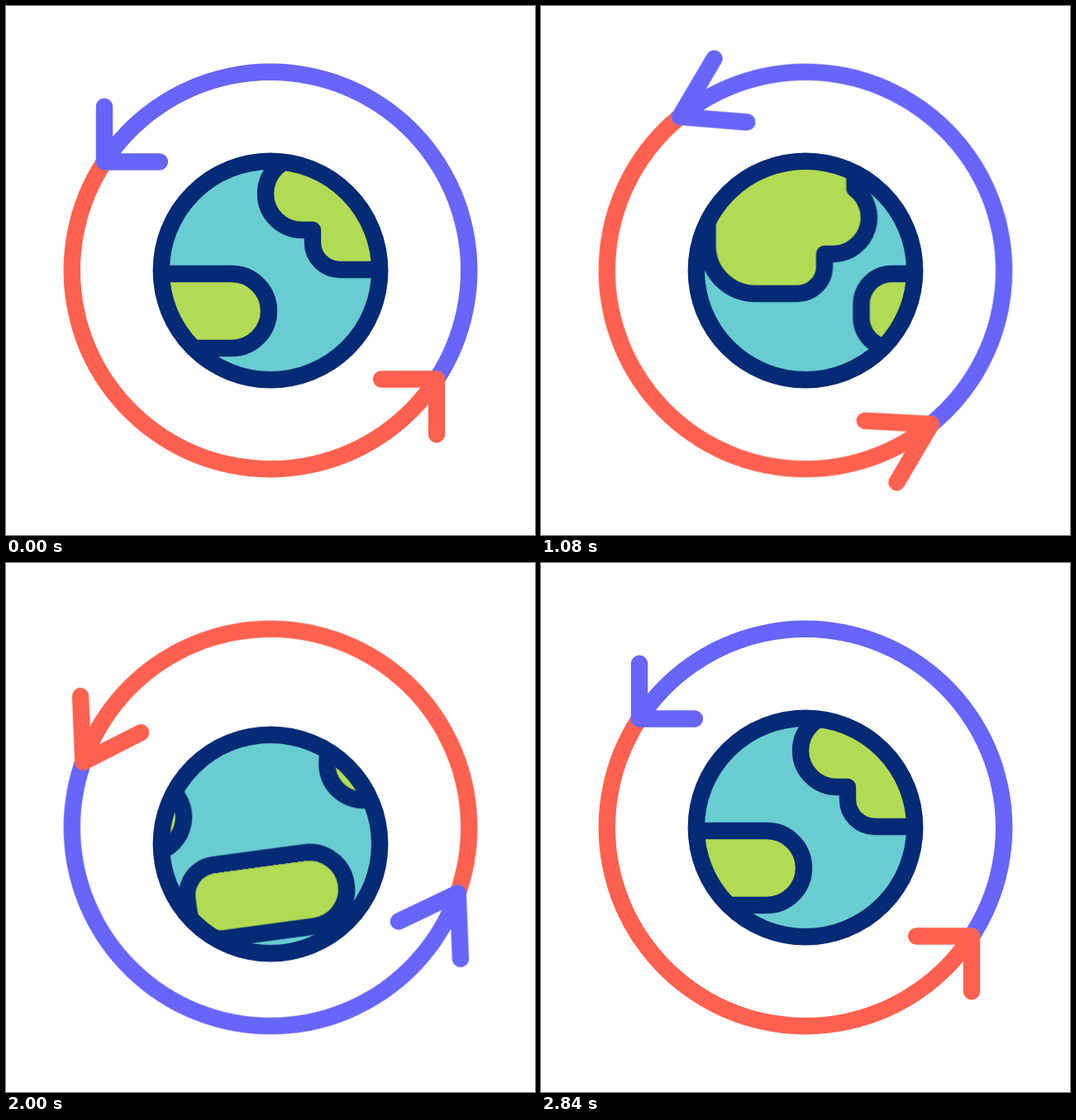
Animation, 640 px wide and 640 px high, one loop 3 s. Source, as an HTML page:

```html
<!DOCTYPE html>
<html lang="en">
<head>
<meta charset="utf-8">
<title>Turning globe</title>
<style>
  html, body { margin: 0; width: 100%; height: 100%; overflow: hidden; background: #fff; }
  svg { display: block; width: 100%; height: 100%; }

  .line { fill: none; stroke-width: 20.4; stroke-linejoin: round; }
  .head { stroke-linecap: round; }
  .purple { stroke: #6865fa; }
  .red { stroke: #ff6150; }
  .navy { stroke: #032a74; }
  .sea { fill: #68ccd1; }
  .land { fill: #b2da53; }

  .spin, .bob, .slide, .tilt, .head {
    --smooth: cubic-bezier(.333, 0, .667, 1);
    --swing: cubic-bezier(.533, 0, .336, 1);
    animation: 3s infinite var(--smooth);
  }
  .spin { animation-name: spin; }
  .bob { animation-name: bob; }
  .slide { animation-name: slide; animation-timing-function: var(--swing); }
  .tilt { animation-name: tilt; animation-timing-function: var(--swing); }
  .head.purple { animation-name: stretch-purple; }
  .head.red { animation-name: stretch-red; }

  /* The arrows wind back before the full turn. */
  @keyframes spin {
    0% { transform: rotate(0deg); }
    22.667% { transform: rotate(52deg); animation-timing-function: cubic-bezier(.335, 0, .805, 1); }
    93.333%, 100% { transform: rotate(-360deg); }
  }
  @keyframes bob {
    0%, 36%, 93.333%, 100% { transform: translateY(0); }
    20% { transform: translateY(-12.5px); }
    44.667% { transform: translateY(-5px); }
    73.333% { transform: translateY(24px); }
  }
  @keyframes slide {
    0%, 93.333%, 100% { transform: translateX(0); }
    25.667%, 37.333% { transform: translateX(262.5px); }
  }
  @keyframes tilt {
    0%, 38.667%, 85.333%, 100% { transform: rotate(0deg); }
    62.667% { transform: rotate(-8.1deg); }
  }

  /* Arrowheads grow longer and narrower while moving. */
  @keyframes stretch-purple {
    0%, 93.333%, 100% { d: path("M-201 -198.4L-201 -131.5L-134.1 -131.5"); }
    50% {
      d: path("M-178.4 -214L-201 -131.5L-118.5 -154.1");
      animation-timing-function: cubic-bezier(.333, 0, .667, .85);
    }
  }
  @keyframes stretch-red {
    0%, 93.333%, 100% { d: path("M-201 -198.4L-201 -131.5L-134.1 -131.5"); }
    50% {
      d: path("M-178.4 -214L-201 -131.5L-120.7 -156.3");
      animation-timing-function: cubic-bezier(.333, 0, .667, .85);
    }
  }
</style>
</head>
<body>
<svg viewBox="-320 -320 640 640">
  <defs>
    <clipPath id="disc"><circle r="136"/></clipPath>
    <path id="arc" d="M201 131.5A240 240 0 0 0 -201 -131.5"/>
  </defs>
  <g class="line spin">
    <use href="#arc" class="purple"/>
    <use href="#arc" class="red" transform="rotate(180)"/>
    <path class="head purple" d="M-201 -198.4L-201 -131.5L-134.1 -131.5"/>
    <g transform="rotate(180)">
      <path class="head red" d="M-201 -198.4L-201 -131.5L-134.1 -131.5"/>
    </g>
  </g>
  <g class="bob">
    <g clip-path="url(#disc)">
      <circle class="sea" r="136"/>
      <g class="slide">
        <g class="line navy tilt">
          <path class="land" d="M38 -137A44 44 0 0 0 38 -49H51V-34A33 33 0 0 0 84 -1H500V-137Z"/>
          <path class="land" d="M-47 4A45 45 0 0 1 -47 94H-158A37 37 0 0 1 -195 57V41A37 37 0 0 1 -158 4Z"/>
          <path class="land" d="M-220 -151Q-203 -136 -203 -113V-99A44 44 0 0 1 -227.5 -20H-239.5V-5A33 33 0 0 1 -272.5 28H-323A58 58 0 0 1 -381 -30V-230H-220Z"/>
        </g>
      </g>
    </g>
    <circle class="line navy" r="132.2"/>
  </g>
</svg>
</body>
</html>
```
